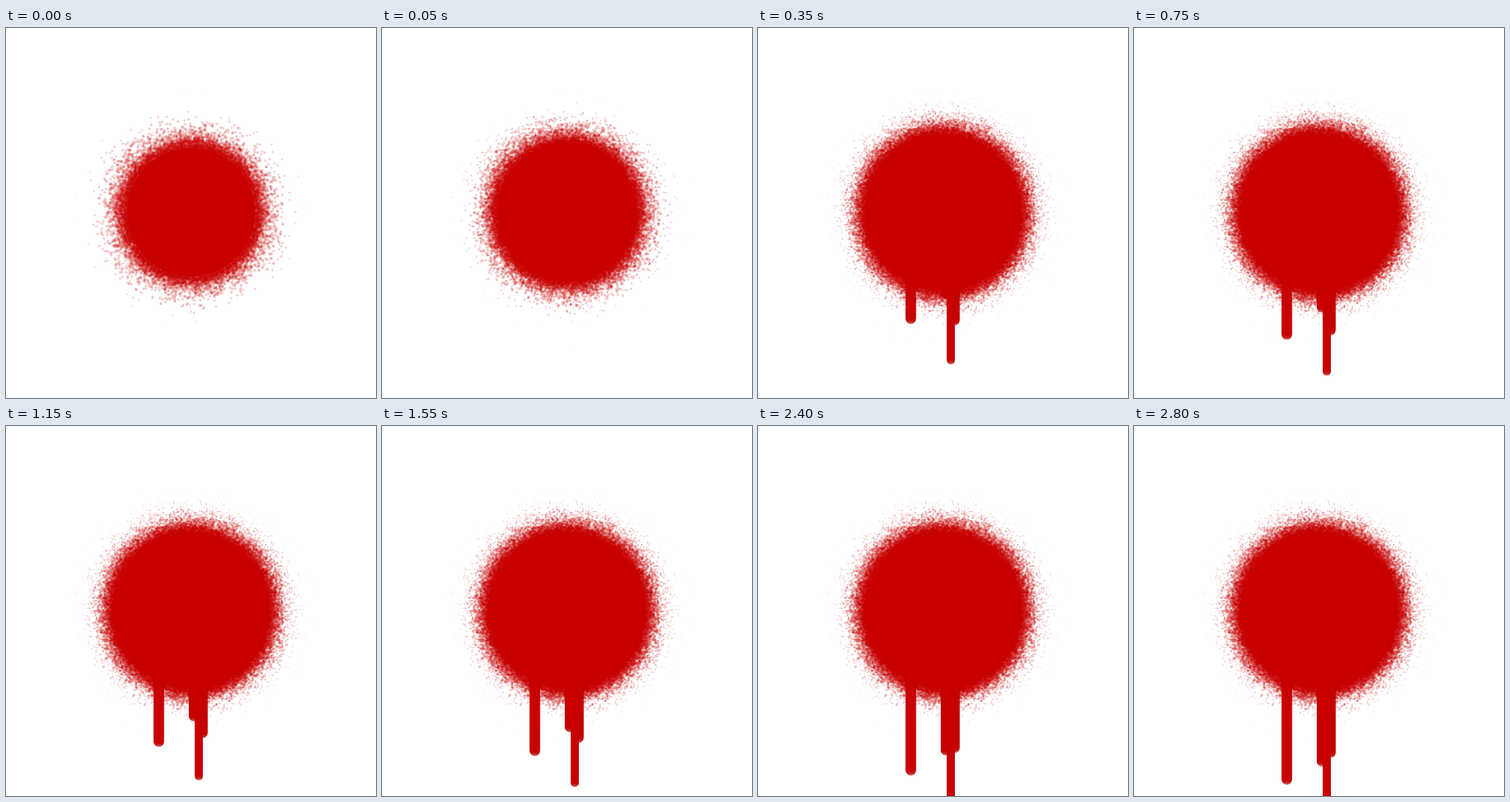
These frames come from a looping animation (500 px wide and 500 px high, 2850 ms). An HTML page with a canvas:

```html
<!DOCTYPE html>
<html lang="en">
<head>
<meta charset="utf-8">
<title>Spray paint</title>
<style>
  html, body { margin: 0; width: 100%; height: 100%; overflow: hidden; background: #fff; }
  canvas { display: block; width: 100vmin; height: 100vmin; }
</style>
</head>
<body>
<canvas id="stage" width="500" height="500"></canvas>
<script>
const SIZE = 500, LOOP = 2850, STEP = 50, BURSTS = 10;
const CX = 250, CY = 249, FALLOFF = 9, COVERAGE = 12;
const DRIP_TOP = 340, DRIP_EASE = 80;
const PAINT = '#c80000', EDGE = '#980000';
const ctx = document.getElementById('stage').getContext('2d');

let seed = 20117;
function random() {
  seed = (seed + 0x6d2b79f5) | 0;
  let n = Math.imul(seed ^ (seed >>> 15), 1 | seed);
  n = (n + Math.imul(n ^ (n >>> 7), 61 | n)) ^ n;
  return ((n ^ (n >>> 14)) >>> 0) / 4294967296;
}

// Radius where the paint turns opaque, and the safely solid part inside it.
const opaqueRadius = burst => 112 - 19 * Math.exp(-burst / 2);
const solidRadius = burst => opaqueRadius(burst) - 6;

function disc(c, x, y, r) {
  c.beginPath();
  c.arc(x, y, r, 0, 2 * Math.PI);
  c.fill();
}

// Each burst adds the droplets that push the opaque core outwards;
// their density falls off exponentially with distance.
function sprayLayer(burst) {
  const canvas = document.createElement('canvas');
  canvas.width = canvas.height = SIZE;
  const c = canvas.getContext('2d');
  c.fillStyle = PAINT;
  const dot = 1.5 + 0.4 * Math.exp(-burst);
  const inner = solidRadius(burst);
  const growth = burst ? opaqueRadius(burst) - opaqueRadius(burst - 1) : Infinity;
  const coverage = COVERAGE * Math.exp((opaqueRadius(burst) - inner) / FALLOFF)
    * (1 - Math.exp(-growth / FALLOFF));
  const count = coverage * 2 * inner * FALLOFF / (dot * dot);

  disc(c, CX, CY, inner);
  c.globalAlpha = 0.2;
  for (let i = 0; i < count; i++) {
    const r = inner - FALLOFF * Math.log(1 - random());
    const angle = random() * 2 * Math.PI;
    const fade = Math.min(1, Math.max(0.15, 1 - (r - 120) / 60));
    const radius = dot * fade * (0.85 + 0.3 * random());
    if (r < 184) disc(c, CX + r * Math.cos(angle), CY + r * Math.sin(angle), radius);
  }
  return canvas;
}

const layers = Array.from({ length: BURSTS }, (_, i) => sprayLayer(i));

// A drip shoots down towards `rest`, then keeps creeping at `speed` px per ms.
const drips = [
  { x: 254, width: 14, start: 200, rest: 356.5, speed: 0.037 },
  { x: 265.5, width: 14, start: 174, rest: 403.5, speed: 0.016 },
  { x: 206.5, width: 14, start: 200, rest: 398, speed: 0.031 },
  { x: 260.5, width: 11, start: 120, rest: 453, speed: 0.0225 }
];

const tipAt = ({ start, rest, speed }, t) =>
  rest - (rest - DRIP_TOP) * Math.exp((start - t) / DRIP_EASE) + speed * t;

function column(x, width, tip, color) {
  const half = width / 2;
  const shade = ctx.createLinearGradient(0, tip - 7, 0, tip);
  shade.addColorStop(0, color);
  shade.addColorStop(1, color + '50');
  ctx.fillStyle = shade;
  ctx.beginPath();
  ctx.moveTo(x - half, DRIP_TOP - 8);
  ctx.lineTo(x + half, DRIP_TOP - 8);
  ctx.arc(x, tip - half, half, 0, Math.PI);
  ctx.fill();
}

function drawDrip(drip, t) {
  if (t < drip.start) return;
  const tip = tipAt(drip, t);
  column(drip.x, drip.width, tip, EDGE);
  column(drip.x, drip.width - 0.6, tip, PAINT);
}

function draw(t) {
  ctx.fillStyle = '#fff';
  ctx.fillRect(0, 0, SIZE, SIZE);
  const burst = Math.min(BURSTS - 1, t / STEP);
  for (let i = 0; i <= burst; i++) ctx.drawImage(layers[i], 0, 0);
  drips.forEach(drip => drawDrip(drip, t));
  ctx.fillStyle = PAINT;
  disc(ctx, CX, CY, solidRadius(burst));
}

const start = performance.now();
function tick() {
  const t = (performance.now() - start) % LOOP;
  draw(Math.floor(t / STEP) * STEP);
  requestAnimationFrame(tick);
}
tick();
</script>
</body>
</html>
```
